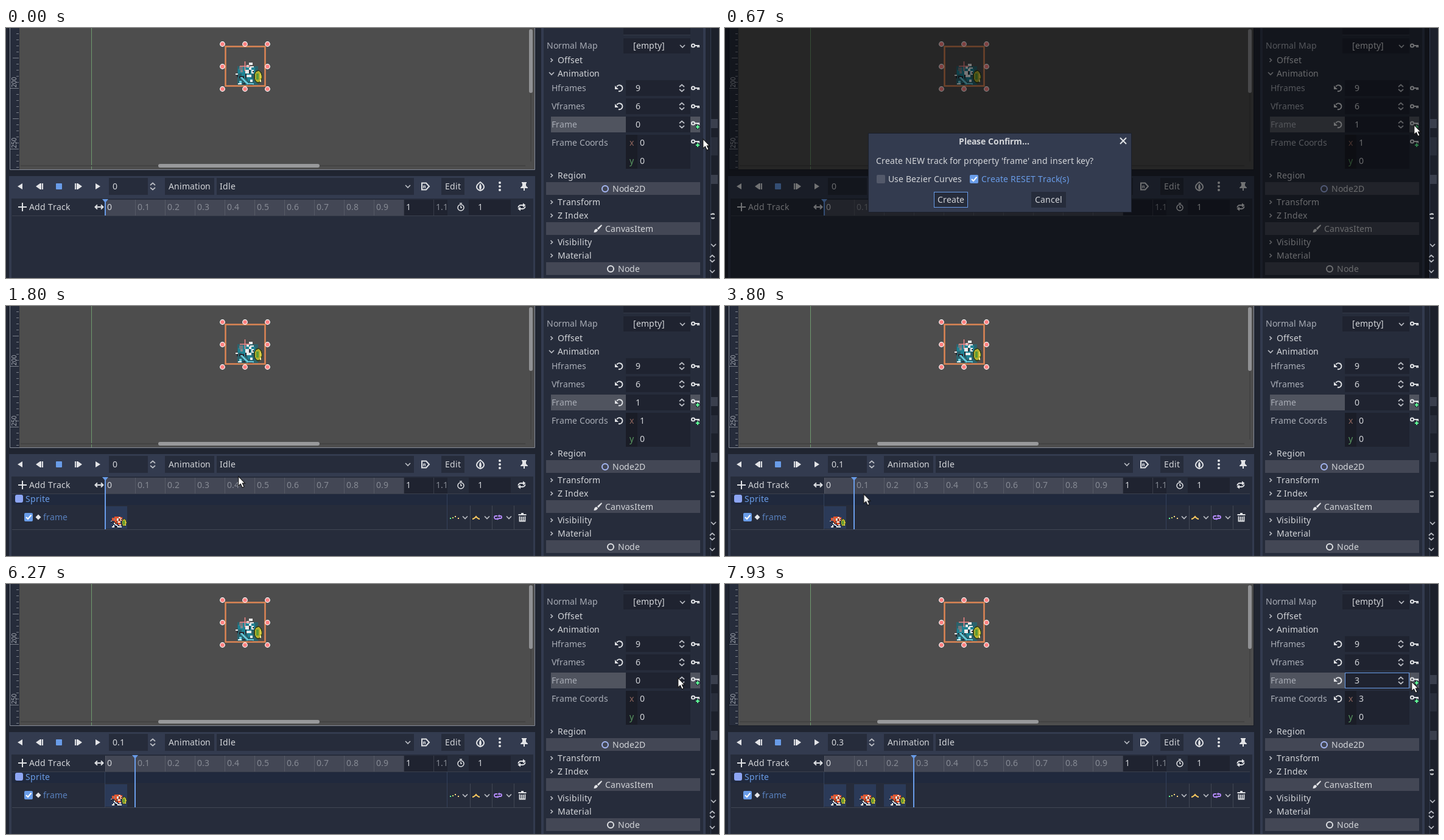
Write an HTML page that moves like this. It is 1171 px wide and 412 px high and loops after 8 s.

```html
<!DOCTYPE html>
<html lang="en">
<head>
<meta charset="utf-8">
<title>Animation track editor</title>
<style>
html, body { margin: 0; width: 100%; height: 100%; overflow: hidden; background: #202531; }
svg { display: block; width: 1171px; height: 412px; }
text { font: 14px "Noto Sans", "Open Sans", sans-serif; fill: #d3d5d9; white-space: pre; }
.dim { fill: #a9adb6; }
.faint { fill: #868a94; }
.blue { fill: #699ce8; }
.axis-x { fill: #8e655d; }
.axis-y { fill: #5b9a62; }
.bold { font-weight: 700; }
.line { fill: none; stroke: #dfe1e4; stroke-width: 2; }
.thin { stroke-width: 1.7; stroke: #b9bcc3; }
.white { fill: #e3e4e7; }
.step { animation: 8s step-end infinite; }
#cursor { animation: move 8s ease-in-out infinite; }
@keyframes move {
  0% { transform: translate(1144px, 182px); }
  2.5%, 10.83% { transform: translate(1131px, 159px); }
  21.6%, 24.2% { transform: translate(381px, 280px); }
  30.5% { transform: translate(188px, 342px); }
  35%, 38.3% { transform: translate(206px, 306px); }
  40%, 44.2% { transform: translate(209px, 308px); }
  45%, 46.67% { transform: translate(212px, 302px); animation-timing-function: linear; }
  47.5% { transform: translate(227px, 309px); animation-timing-function: cubic-bezier(.4, .1, .8, .8); }
  52.5% { transform: translate(520px, 371px); animation-timing-function: ease-out; }
  57.5% { transform: translate(752px, 344px); }
  59.1%, 60.8% { transform: translate(744px, 341px); animation-timing-function: cubic-bezier(.4, 0, .7, .8); }
  65.875% { transform: translate(1052px, 205px); animation-timing-function: ease-out; }
  71.6% { transform: translate(1098px, 163px); }
  74.1%, 75% { transform: translate(1097px, 158px); }
  78.375% { transform: translate(1103px, 154px); }
  80% { transform: translate(1104px, 155px); }
  81.6%, 82.5% { transform: translate(1116px, 160px); }
  86.25%, 100% { transform: translate(1127px, 160px); }
}
</style>
</head>
<body>
<svg id="stage" viewBox="0 0 1171 412" xmlns="http://www.w3.org/2000/svg"></svg>
<script>
const LOOP = 8000;
const BASE = '#333b4f', PANEL = '#262c3b', GAP = '#202531', FIELD = '#1f2330', BAR = '#434755', ACCENT = '#699ce8';

// Stepped keyframes: pairs of [time in ms, declaration]
const stepped = (name, pairs) => `@keyframes ${name}{` +
  pairs.map(([t, rule]) => `${Math.max(0, t - 4) / LOOP * 100}%{${rule}}`).join('') +
  `100%{${pairs[pairs.length - 1][1]}}}`;

// Times at which a part is switched on, off, on ...
const shown = {
  value0: [0, 670, 3470, 6330],
  value1: [670, 3470, 6330, 7270],
  value2: [7270, 7800],
  value3: [7800],
  time0: [0, 3470],
  time1: [3470, 7270],
  time2: [7270, 7800],
  time3: [7800],
  reset: [670, 3470, 6330],
  resetCoords: [1800, 3470, 6330],
  dialog: [670, 1800],
  hover: [1670, 1800],
  track: [1800],
  key2: [7270],
  key3: [7800],
  field: [6330],
  view: [0, 670, 1800, 6330]
};

let css = '';
for (const [name, times] of Object.entries(shown)) {
  const pairs = times.map((t, i) => [t, `opacity:${1 - i % 2}`]);
  if (times[0] > 0) pairs.unshift([0, 'opacity:0']);
  css += stepped(name, pairs);
}
const shift = (axis, list) => list.map(([t, d]) => [t, `transform:translate${axis}(${d}px)`]);
css += stepped('playhead', shift('X', [[0, 0], [3470, 49], [7270, 98], [7800, 147]]));
css += stepped('bob', shift('Y', [[0, 0], [670, 1], [3470, 0], [6330, 1], [7270, 2], [7800, 3]]));
document.head.appendChild(document.createElement('style')).textContent = css;

const pen = document.createElement('canvas').getContext('2d');

// The editor sets every glyph on a whole pixel
function text(x, y, s, cls = '') {
  pen.font = `${cls.includes('bold') ? 700 : 400} 14px "Noto Sans", "Open Sans", sans-serif`;
  let next = x;
  const xs = [...String(s)].map(c => {
    const left = next;
    next += Math.round(pen.measureText(c).width);
    return left;
  });
  return `<text x="${xs.join(' ')}" y="${y}" class="${cls}">${s}</text>`;
}
const rect = (x, y, w, h, fill, extra = '') =>
  `<rect x="${x}" y="${y}" width="${w}" height="${h}" fill="${fill}" ${extra}/>`;
const path = (d, cls = 'line', extra = '') => `<path d="${d}" class="${cls}" ${extra}/>`;
const at = (x, y, body) => `<g transform="translate(${x} ${y})">${body}</g>`;
const step = (name, body) => `<g class="step" style="animation-name:${name}">${body}</g>`;
const repeat = (n, fn) => Array.from({ length: n }, (_, i) => fn(i)).join('');
const circle = (x, y, r, extra) => `<circle cx="${x}" cy="${y}" r="${r}" ${extra}/>`;

const down = (x, y) => path(`M${x - 4} ${y - 2}l4 4 4-4`, 'line thin');
const right = (x, y) => path(`M${x - 1.5} ${y - 3}l3 3-3 3`, 'line thin');
const spin = (x, y) => path(`M${x - 4} ${y - 2}l4-3.500 4 3.500M${x - 4} ${y + 2}l4 3.500 4-3.500`, 'line thin');
const reset = y => at(1007, y, path('M-3.8-2.5A5 5 0 1 1-1 5') + path('M-7-4v6h6z', 'white'));
const keyIcon = (y, plus) => at(1131, plus ? y - 2 : y,
  circle(-2.5, 0, 2.6, 'class="line"') + path('M0 0h8M5 0v3M7.200 0v3', 'line', 'style="stroke-width:1.8"') +
  (plus ? path('M5 2v8M1 6h8', '', 'stroke="#26313a" stroke-width="4"') +
    path('M5 3v6M2 6h6', '', 'stroke="#5fff97" stroke-width="2"') : ''));
const check = (x, y) => rect(x, y, 14, 14, ACCENT, 'rx="2"') +
  path(`M${x + 3} ${y + 7}l3 3 5.5-6.5`, 'line', 'style="stroke:#fff"');

function hero(x, y, scale, [hood, face, dark, stick], moving) {
  const px = (x, y, w, h, c) => rect(x, y, w, h, c);
  const top = px(5, 3, 8, 3, hood) + px(2, 5, 6, 4, hood) + px(12, 4, 4, 5, hood) +
    px(0, 9, 2, 1, face) + px(1, 10, 1, 2, dark) + px(4, 6, 2, 2, '#85878c') + px(8, 6, 3, 3, face) +
    px(11, 4, 2, 2, face) + px(13, 6, 2, 3, face) + px(11, 6, 1, 3, dark) + px(14, 7, 1, 1, dark) +
    (moving ? px(11, 0, 3, 2, face) + px(9, 2, 2, 2, face) + px(12, 3, 3, 1, face) + px(3, 3, 3, 3, '#74777c') : '');
  const low = px(5, 9, 8, 4, hood) + px(3, 11, 4, 2, dark) + px(9, 10, 4, 2, face) + px(8, 9, 1, 4, dark) +
    repeat(6, i => px(4 + i, 12 + i, 2, 1, stick)) + px(10, 13, 4, 2, hood) + px(12, 14, 2, 2, face) +
    px(3, 15, 2, 2, stick) + px(2, 17, 3, 1, face) + px(6, 17, 2, 1, dark) + px(11, 17, 4, 1, stick) +
    px(10, 18, 4, 1, dark);
  const shield = '<ellipse cx="18.6" cy="11.6" rx="3.2" ry="5" fill="#b3b02c" stroke="#33401f" stroke-width=".8"/>' +
    px(17, 9, 2, 5, '#5d9a36') + px(20, 9, 1, 4, '#e0cf45') + px(20, 14, 1, 2, '#f1e99a');
  return `<g transform="translate(${x} ${y}) scale(${scale})" shape-rendering="crispEdges">` +
    low + (moving ? step('bob', top) : top) + shield + '</g>';
}

function viewport() {
  const ticks = repeat(23, i => {
    const y = 9 + i * 10, len = (y - 99) % 100 === 0 ? 14 : (y - 49) % 100 === 0 ? 10 : 4;
    return rect(21 - len, y, len, 1, '#7c818c');
  });
  const label = (y, s) =>
    `<text transform="translate(17 ${y}) rotate(-90)" style="font-size:10px" class="dim">${s}</text>`;
  const handles = repeat(9, i => i === 4 ? '' :
    circle(355 + i % 3 * 37, 26 + Math.floor(i / 3) * 37, 3.8, 'fill="#ff8080" stroke="#fff" stroke-width="1.2"'));
  return rect(6, 0, 863, 234, '#191d27') + rect(7, 0, 861, 233, '#4d4d4d') + rect(7, 0, 15, 233, PANEL) +
    ticks + label(98, '200') + label(198, '250') + rect(140, 0, 1, 233, '#6f9a6f') +
    rect(861, 2, 2, 218, '#434343') + rect(859, 2, 6, 105, '#909194', 'rx="3"') +
    rect(24, 226, 829, 2, '#434343') + rect(250, 224, 265, 6, '#98999b', 'rx="3"') +
    rect(380, 63, 34, 32, '#2a626c') +
    hero(377, 57, 2, ['#1f8394', '#ececec', '#2b2b33', '#69cbdc'], true) +
    rect(360.5, 30.5, 65, 65, 'none', 'stroke="#dd8554" stroke-width="2.5"') +
    path('M392.5 55v16M384 63h17', '', 'stroke="#f48686" stroke-width="1.5"') + at(.5, .5, handles) +
    step('view', path('M6.5 0V233.5H868.5V0', '', 'fill="none" stroke="#858b98"'));
}

function toolbar() {
  const play = (x, dir, bar) => at(x, 261, `<g transform="scale(${dir} 1)">` +
    path(bar ? 'M-1-5v10l7-5z' : 'M-4-5v10l8-5z', 'white') +
    (bar ? rect(-6, -5, 2, 10, '#e3e4e7') + rect(-3, -5, 2, 10, '#e3e4e7') : '') + '</g>');
  return rect(5, 244, 864, 168, BASE) + play(23, -1) + play(55, -1, true) +
    rect(82, 256, 10, 10, ACCENT, 'rx="1"') + play(119, 1, true) + play(151, 1) +
    rect(169, 247, 64, 28, PANEL) + spin(241, 261) +
    ['0', '0.1', '0.2', '0.3'].map((s, i) => step('time' + i, text(175, 266, s))).join('') +
    rect(261, 247, 81, 28, PANEL) + text(267, 266, 'Animation') +
    rect(346, 247, 324, 28, PANEL) + text(351, 266, 'Idle') + down(660, 261) +
    path('M683 255.5h7l5 5.5-5 5.5h-7z', 'line') + path('M685.5 264v-4h3v4M685.5 262h3', 'line', 'style="stroke-width:1"') +
    rect(715, 247, 38, 28, PANEL) + text(721, 266, 'Edit') +
    path('M779 254q-6 4-6 8t6 6q6-2 6-6t-6-8z', 'line') + path('M779 256q-4 7 0 11q4-4 0-11z', 'white') +
    [255, 261, 267].map(y => circle(811, y, 2, 'class="white"')).join('') +
    path('M847 254h8v2h-1v4l3 3v1h-5v4h-2v-4h-5v-1l3-3v-4h-1z', 'white');
}

function timeline() {
  const labels = repeat(11, i => text(166 + i * 49 + (i ? 1 : 0), 300,
    i === 10 ? '1' : i ? '0.' + i : '0', i % 10 ? 'faint' : ''));
  return rect(9, 281, 857, 131, PANEL) +
    rect(163, 283, 490, 26, BAR) + rect(653, 283, 72, 26, FIELD) +
    repeat(12, i => rect(163 + i * 49, 283, 1, 26, i < 10 ? '#565a66' : '#393d49')) +
    labels + `<svg x="703" y="283" width="21" height="26">${text(3, 17, '1.1', 'faint')}</svg>` +
    rect(10, 309, 852, 1, '#3b404d') +
    path('M20 295h14M27 288v14') + text(38, 300, 'Add Track') +
    path('M148 295h10M150 291.5l-3.5 3.5 3.5 3.5M156 291.5l3.5 3.5-3.5 3.5') +
    circle(747, 296, 5, 'class="line" style="stroke-width:1.5"') + path('M745 289h4M747 293v3h2', 'line', 'style="stroke-width:1.5"') +
    rect(760, 283, 69, 25, FIELD) + text(775, 300, '1') +
    path('M841.500 296a4 4 0 0 1 4-4h4M852.500 294a4 4 0 0 1-4 4h-4', 'line') +
    path('M849 288.500l4.500 3.500-4.500 3.500zM845 294.500l-4.500 3.500 4.500 3.500z', 'white');
}

function track() {
  const thumb = x => rect(x, 330, 36, 37, '#2b3a58') +
    hero(x + 9, 343, 1.2, ['#e2552f', '#f2eadf', '#191919', '#e9f2f2']);
  return step('track',
    rect(10, 310, 852, 18, '#20293d') + rect(15, 311, 13, 13, '#8da5f3', 'rx="3"') +
    text(32, 323, 'Sprite', 'blue') + check(30, 341) +
    path('M53 343.5l4.5 4.5-4.5 4.5-4.5-4.5z', 'white') +
    `<g opacity=".75">${text(61, 353, 'frame', 'blue')}</g>` +
    rect(10, 368, 852, 1, '#414754') + rect(162, 310, 1, 58, '#34415a') +
    rect(724, 310, 1, 58, '#34415a') + [762, 798, 834].map(x => rect(x, 329, 1, 39, '#414754')).join('') +
    thumb(163) +
    rect(729, 349, 2, 2, '#5fff97') + rect(733, 348, 2, 2, '#c9e26c') + rect(737, 346, 2, 2, '#ffd684') + rect(742, 349, 2, 2, '#ffd684') +
    path('M766 351q3 0 6-4q3 4 6 4', 'line', 'style="stroke:#ffca5f"') +
    path('M807 346h-2.500a2.500 2.500 0 0 0 0 5h2M809 350h3a2 2 0 0 0 0-4h-2', 'line', 'style="stroke:#b78cff;stroke-width:1.8"') +
    path('M806.500 348.500l3.500 2.500-3.500 2zM810.500 343.500l-3 2.500 3 2.500z', '', 'fill="#b78cff"') +
    [754, 790, 826].map(x => down(x, 348.5)).join('') +
    path('M841.500 344h13M846 342h4M843.5 346.500v8h9v-8M846.5 347v7M849.5 347v7', 'line', 'style="stroke-width:1.8"')) +
    step('key2', thumb(212)) + step('key3', thumb(261)) +
    step('playhead', rect(162, 283, 2, 26, ACCENT) + path('M158 282h10l-5 6z', 'blue') +
      step('track', rect(162, 309, 2, 59, ACCENT)));
}

function inspector() {
  const section = (y, s, open) => (open ? down : right)(896, y) + text(906, y + 5, s);
  const number = (y, name, value) => text(896, y + 5, name, 'dim') + rect(1018, y - 13, 106, 26, FIELD) +
    (value ? text(1034, y + 5, value) : '') + spin(1110, y);
  const bar = (y, x, s, icon) => rect(887, y - 11, 253, 21, BAR) + icon + text(x, y + 5, s);
  const values = (x, y) => repeat(4, i => step('value' + i, text(x, y, i)));
  return rect(879, 0, 270, 412, BASE) + rect(883, 0, 262, 412, PANEL) +
    rect(1014, 0, 110, 11, FIELD) + rect(1014, 11, 110, 1, '#343a48') +
    text(888, 34, 'Normal Map', 'dim') + rect(1014, 17, 110, 25, FIELD) + text(1030, 34, '[empty]') +
    down(1111, 30) + keyIcon(29) + section(53, 'Offset') + section(75, 'Animation', true) +
    number(99, 'Hframes', 9) + reset(99) + keyIcon(99) +
    number(129, 'Vframes', 6) + reset(129) + keyIcon(129) +
    rect(895, 146, 123, 26, '#50545f') + rect(1124, 146, 16, 26, '#50545f') +
    number(159, 'Frame') + values(1034, 164) + step('reset', reset(159)) + keyIcon(159, true) +
    step('field', rect(1018.5, 146.5, 105, 25, 'none', `stroke="${ACCENT}"`)) +
    text(896, 194, 'Frame Coords', 'dim') + rect(1018, 176, 106, 56, FIELD) + rect(1018, 176, 19, 56, '#1a1d27') +
    text(1024, 194, 'x', 'axis-x') + text(1024, 224, 'y', 'axis-y') +
    values(1041, 194) + text(1041, 224, '0') + step('resetCoords', reset(189)) + keyIcon(189, true) +
    section(243, 'Region') +
    bar(265, 996, 'Node2D', circle(984, 265, 5, 'class="line" style="stroke:#a5b7f3"')) +
    section(287, 'Transform') + section(309, 'Z Index') +
    bar(331, 984, 'CanvasItem', path('M978 324l-7 6 2 2.5 6-7zM970 331q-4 0-4.5 6 5.500 0 6.500-4z', 'white')) +
    section(353, 'Visibility') + section(375, 'Material') +
    bar(397, 1005, 'Node', circle(993, 397, 5, 'class="line"'));
}

function edge() {
  return rect(1157, 0, 14, 412, '#1c202b') + rect(1157, 0, 1, 412, BASE) +
    rect(1158, 150, 11, 15, '#3a3f4d') + rect(1158, 180, 11, 30, '#292e3b') + rect(1158, 242, 11, 15, '#3a3f4d') +
    path('M1157 307h3v-2M1164 307h-2v-2M1158 313h2v2M1164 313h-2v2', 'line', 'style="stroke-width:1.5"') +
    down(1162, 358) + spin(1160, 380) + down(1160, 401);
}

function dialog() {
  return step('dialog', rect(0, 0, 1157, 412, '#000', 'opacity=".5"') +
    rect(235, 173, 433, 131, '#1b202c') + rect(236, 174, 431, 129, BASE) +
    text(384, 192, 'Please Confirm...', 'bold') + path('M649 181l10 10M659 181l-10 10') +
    text(248, 224, "Create NEW track for property 'frame' and insert key?") +
    rect(249, 242, 14, 14, '#53596a', 'rx="2"') + text(268, 254, 'Use Bezier Curves') +
    check(402, 242) + text(421, 254, 'Create RESET Track(s)', 'blue') +
    rect(343.5, 270.5, 55, 25, PANEL, `stroke="${ACCENT}"`) + text(349, 288, 'Create') +
    rect(503, 270, 57, 26, PANEL) + text(509, 288, 'Cancel')) +
    step('hover', text(349, 288, 'Create', 'white'));
}

const cursor = '<g id="cursor">' +
  '<path d="M.8.8V16.400l3.600-3.200 2.700 6.100 2.900-1.300-2.700-5.900h4.300z" fill="#fff" stroke="#111" stroke-width="1.1"/></g>';

document.getElementById('stage').innerHTML = rect(0, 0, 1171, 412, GAP) +
  viewport() + toolbar() + timeline() + track() + inspector() + edge() + dialog() + cursor;
</script>
</body>
</html>
```
